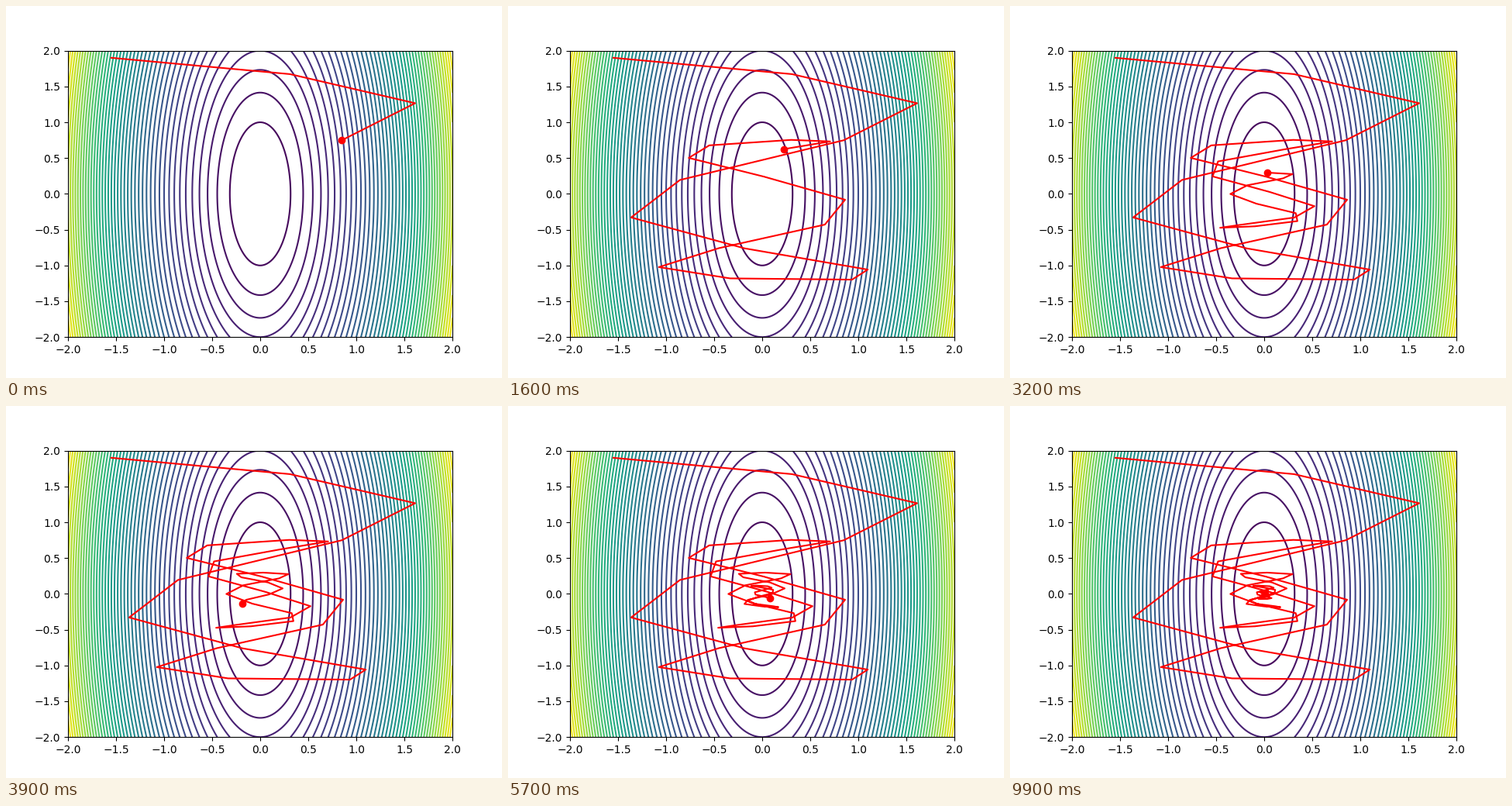
Write a matplotlib script that moves like this. It is 640 by 480 pixels and loops after 10 s.

```python
import numpy as np
import matplotlib.pyplot as plt
from matplotlib.animation import FuncAnimation

FRAMES, INTERVAL = 100, 100
RATE, MOMENTUM = 0.06, 0.9
START = (-1.55, 1.9)
HEAD_START = 3  # steps already taken when the loop begins


def loss(x, y):
    return 10 * x**2 + y**2


def gradient(pos):
    return np.array([20.0, 2.0]) * pos


def descend(steps):
    """Gradient descent with momentum; returns every visited position."""
    pos, velocity = np.array(START), np.zeros(2)
    path = [pos]
    for _ in range(steps):
        velocity = MOMENTUM * velocity - RATE * gradient(pos)
        pos = pos + velocity
        path.append(pos)
    return np.array(path)


path = descend(FRAMES + HEAD_START)

fig, ax = plt.subplots(figsize=(6.4, 4.8), dpi=100)
axis = np.linspace(-2, 2, 200)
X, Y = np.meshgrid(axis, axis)
ax.contour(X, Y, loss(X, Y), 50)
ax.set(xlim=(-2, 2), ylim=(-2, 2))
trail, = ax.plot([], [], "r-")
dot, = ax.plot([], [], "ro")


def update(frame):
    last = frame + HEAD_START
    trail.set_data(*path[:last + 1].T)
    dot.set_data(*path[last:last + 1].T)
    return trail, dot


anim = FuncAnimation(fig, update, frames=FRAMES, interval=INTERVAL,
                     repeat=True, repeat_delay=0)
plt.show()
```
